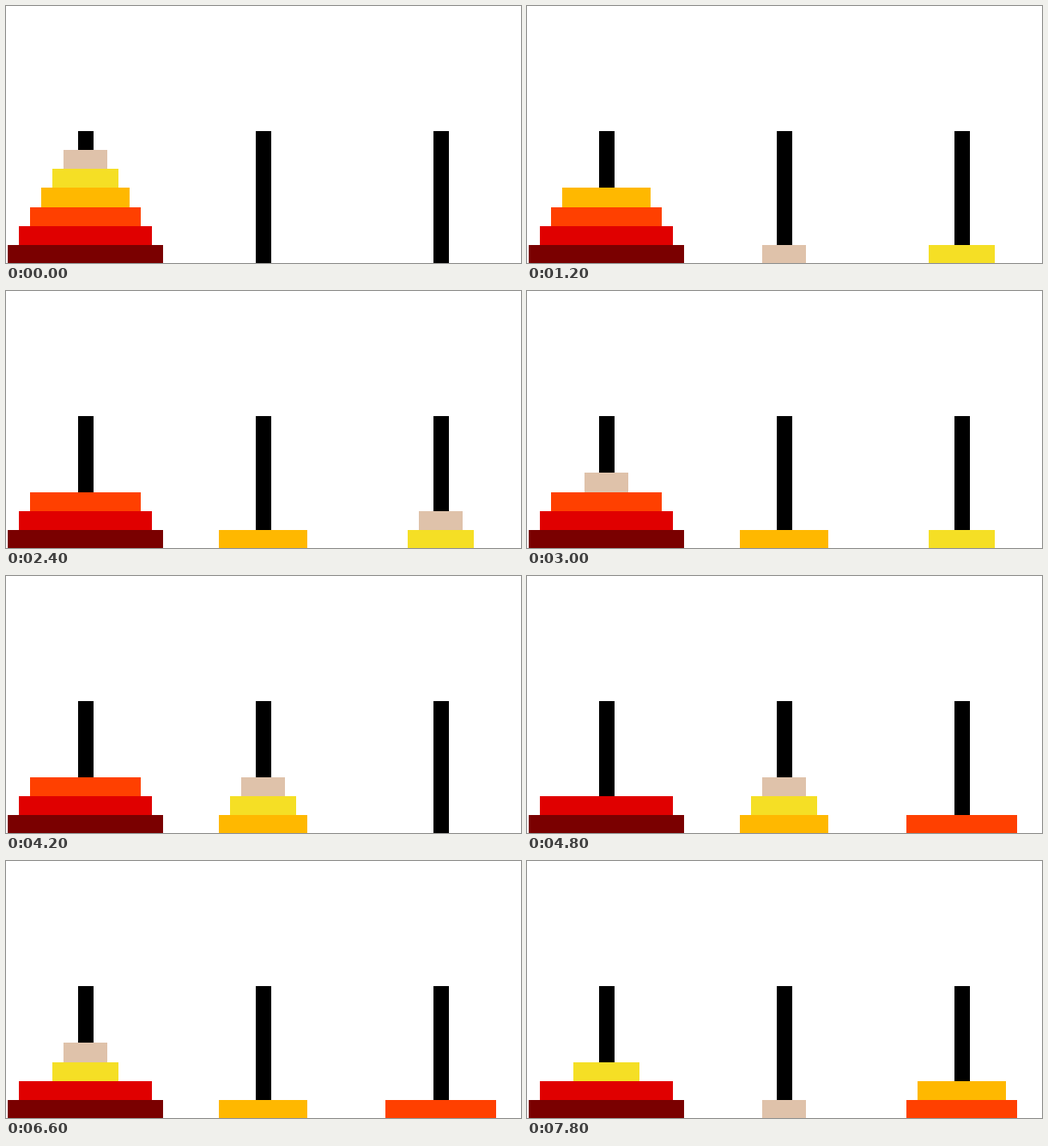
An HTML page with a canvas for the animation above (8 s loop, 600 by 300 pixels).

```html
<!DOCTYPE html>
<html lang="en">
<head>
<meta charset="utf-8">
<title>Tower of Hanoi</title>
<style>
html, body { margin: 0; width: 100%; height: 100%; overflow: hidden; background: #fff; }
canvas { display: block; }
</style>
</head>
<body>
<canvas id="stage" width="600" height="300"></canvas>
<script>
const ctx = document.getElementById('stage').getContext('2d');
const LOOP = 8000, STEP = 600, PEG_GAP = 207;

// Smallest disk first
const colors = ['#dfc2aa', '#f5df25', '#ffb800', '#ff4000', '#e00000', '#7a0000'];

// Each move is [from peg, to peg]
const moves = [
  [0, 1], [0, 2], [1, 2], [0, 1], [2, 0], [2, 1], [0, 1],
  [0, 2], [1, 2], [1, 0], [2, 0], [1, 2], [0, 1]
];

const levelTop = n => Math.floor(301.6 - 22.2 * n);

function pegsAfter(count) {
  const pegs = [[6, 5, 4, 3, 2, 1], [], []];
  for (const [from, to] of moves.slice(0, count)) pegs[to].push(pegs[from].pop());
  return pegs;
}

function draw(count) {
  ctx.fillStyle = '#fff';
  ctx.fillRect(0, 0, 600, 300);
  pegsAfter(count).forEach((disks, peg) => {
    const x = peg * PEG_GAP;
    ctx.fillStyle = '#000';
    ctx.fillRect(x + 84, 146, 18, 154);
    disks.forEach((size, level) => {
      const top = levelTop(level + 1);
      ctx.fillStyle = colors[size - 1];
      ctx.fillRect(x + 80 - 13 * size, top, 25 + 26 * size, levelTop(level) - top);
    });
  });
}

const start = performance.now();
let shown = 0;

function tick() {
  const time = (performance.now() - start) % LOOP;
  const count = Math.floor(time / STEP);
  if (count !== shown) draw(shown = count);
  requestAnimationFrame(tick);
}

draw(0);
requestAnimationFrame(tick);
</script>
</body>
</html>
```
